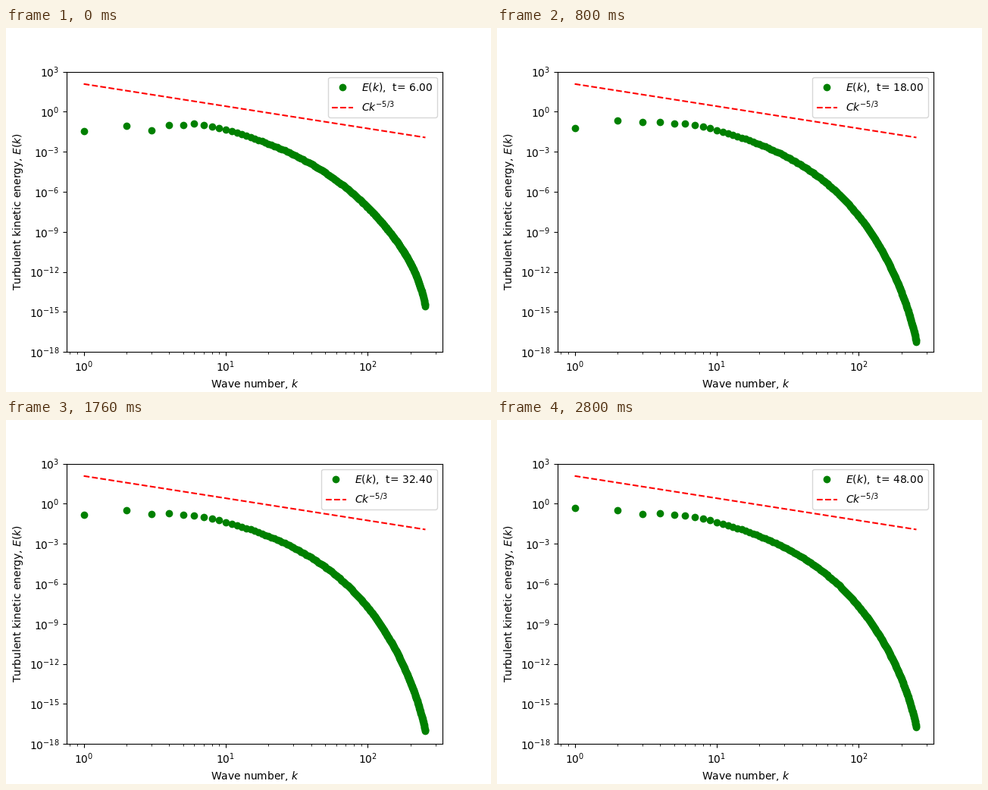
These frames come from a looping animation (640x480 px, 2880 ms). A matplotlib script:

```python
import numpy as np
import matplotlib.pyplot as plt
from matplotlib.animation import FuncAnimation
from matplotlib.ticker import NullLocator

FRAMES, INTERVAL = 36, 80
T_START, T_STEP = 6.0, 1.2

# Lift of the dissipation range at a few moments
LIFT_FRAMES = [0, 7, 13, 18, 22, 29, 35]
LIFT = [2.9, -0.75, -0.55, 1.1, -0.4, -0.35, 0.0]

# Modes k = 2..5 relax to a settled log energy
SETTLED = np.array([-0.46, -0.755, -0.72, -0.84])
DEFICIT = np.array([0.60, 0.645, 0.28, 0.16])
DECAY = np.array([9.0, 2.5, 5.0, 5.0])

k = np.arange(1, 256)
x = k / k[-1]
base = 1.68 - 2.4 * np.log10(k) - 0.0457 * k - 6.2 / k ** 1.5


def spectrum(i):
    lift = np.interp(i, LIFT_FRAMES, LIFT)
    fall = 1 + 0.25 * lift
    log_e = base + lift * x ** 1.8 - fall * x ** 8
    log_e[0] = -1.45 + 1.13 * (i / (FRAMES - 1)) ** 1.35
    log_e[1:5] = SETTLED - DEFICIT * np.exp(-i / DECAY)
    return 10 ** log_e


def label(i):
    return f"$E(k)$,  t= {T_START + T_STEP * i:.2f}"


fig, ax = plt.subplots(figsize=(6.4, 4.8), dpi=100)
points, = ax.loglog(k, spectrum(0), "go")
ax.loglog(k, 120.0 * k ** (-5 / 3), "r--", label="$Ck^{-5/3}$")
ax.set_ylim(1e-18, 1e3)
ax.set_yticks(10.0 ** np.arange(-18, 4, 3))
ax.yaxis.set_minor_locator(NullLocator())
ax.set_xlabel("Wave number, $k$")
ax.set_ylabel("Turbulent kinetic energy, $E(k)$")


def update(i):
    points.set_ydata(spectrum(i))
    points.set_label(label(i))
    return points, ax.legend(loc="upper right")


anim = FuncAnimation(fig, update, frames=FRAMES, interval=INTERVAL,
                     repeat=True, repeat_delay=0)
plt.show()
```
